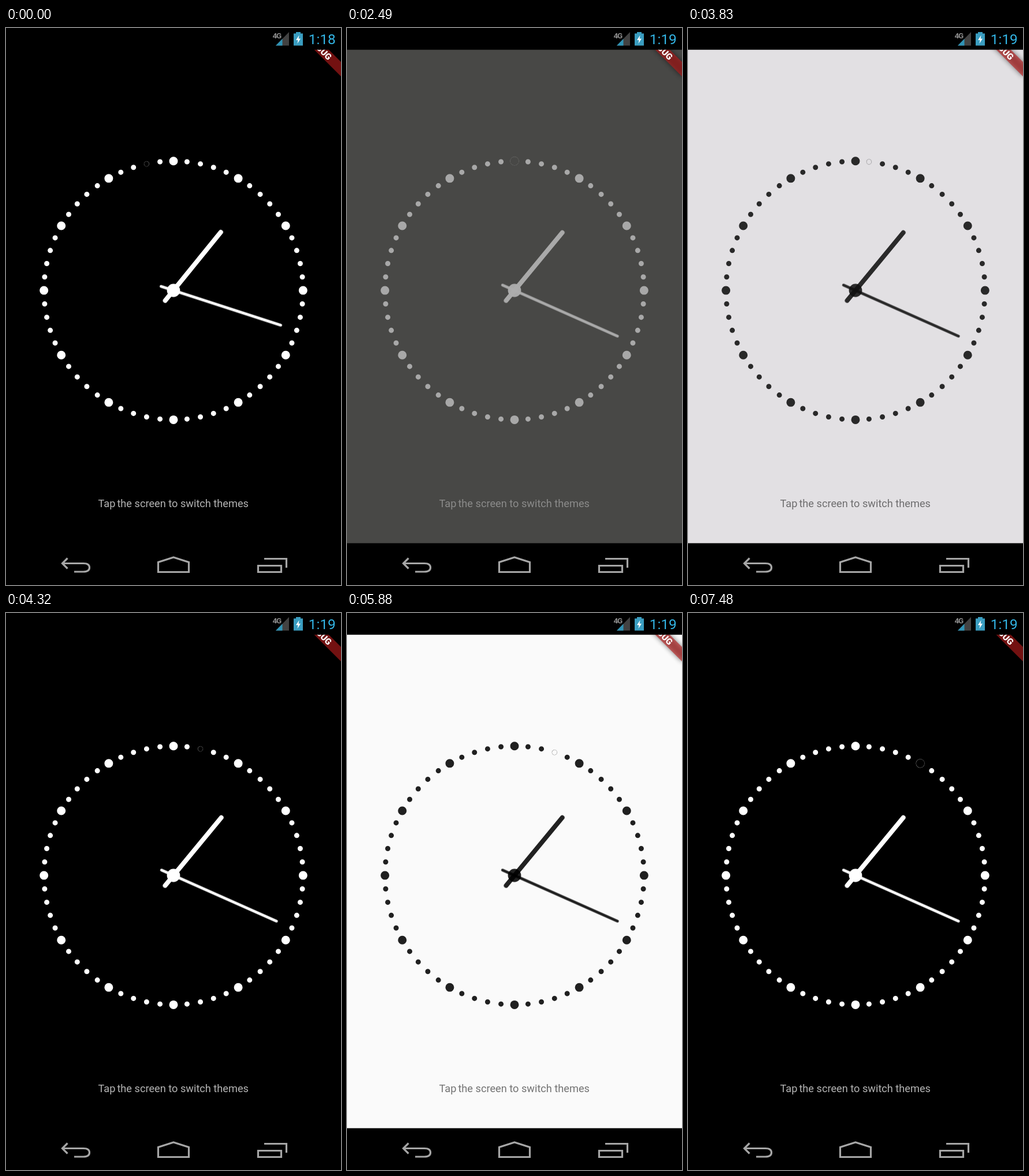
Animation of 580x966 px, one loop 7620 ms. Source, as an HTML page without scripts:

```html
<!DOCTYPE html>
<html lang="en">
<head>
<meta charset="utf-8">
<title>Analog clock</title>
<style>
  @property --bg { syntax: "<color>"; inherits: true; initial-value: #000; }
  @property --ink { syntax: "<color>"; inherits: true; initial-value: #fff; }
  @property --tip { syntax: "<color>"; inherits: true; initial-value: #fffb; }

  html, body { margin: 0; width: 100%; height: 100%; overflow: hidden; background: #000; }
  svg { display: block; width: 580px; height: 966px; font-family: Roboto, sans-serif; }

  .app { animation: theme 7.62s linear infinite; }
  .page { fill: var(--bg); }
  .hint { fill: var(--tip); font-size: 18.2px; }
  .dots { fill: none; stroke: var(--ink); stroke-linecap: round; }
  .hand { stroke: var(--ink); stroke-linecap: round; }
  .hub { fill: var(--ink); }

  .hour, .minute, .second, .old, .new, .ring { animation: 7.62s step-end infinite; }
  .hour { animation-name: hour; }
  .minute { animation-name: minute; }
  .second { animation-name: second; }
  .ring { animation-name: ring; fill: var(--bg); stroke: var(--ink); stroke-opacity: .09; }
  .old { animation-name: old; }
  .new { animation-name: new; }

  /* dark > light > dark > light > dark */
  @keyframes theme {
    0%, 29.27%, 56.5%, 65.09%, 92.8%, 100% { --bg: #000; --ink: #fff; --tip: rgba(255,255,255,.7); }
    32.68%, 69.55% { --bg: #484846; --ink: rgba(172,172,172,.97); --tip: rgba(180,180,180,.62); }
    37.3%, 48.69%, 74.7%, 83.86% { --bg: #fafafa; --ink: rgba(0,0,0,.87); --tip: rgba(0,0,0,.54); }
    50.26% { --bg: #e3e1e4; --ink: rgba(15,15,15,.88); --tip: rgba(18,18,18,.56); }
    88.19% { --bg: #a2a4a0; --ink: rgba(76,76,76,.9); --tip: rgba(76,76,76,.6); }
  }
  @keyframes second {
    0% { transform: rotate(-12deg); }
    13.12% { transform: rotate(-6deg); }
    25.59% { transform: rotate(0deg); }
    40.29% { transform: rotate(6deg); }
    53.41% { transform: rotate(12deg); }
    66.54% { transform: rotate(18deg); }
    80.05% { transform: rotate(24deg); }
    92.91%, 100% { transform: rotate(30deg); }
  }
  @keyframes ring {
    0%, 40.29% { r: 4.6px; }
    25.59%, 92.91%, 100% { r: 7.6px; }
  }
  @keyframes hour {
    0% { transform: rotate(39deg); }
    25.59%, 100% { transform: rotate(39.5deg); }
  }
  @keyframes minute {
    0% { transform: rotate(108deg); }
    25.59%, 100% { transform: rotate(114deg); }
  }
  @keyframes old {
    0% { visibility: visible; }
    25.59%, 100% { visibility: hidden; }
  }
  @keyframes new {
    0% { visibility: hidden; }
    25.59%, 100% { visibility: visible; }
  }
</style>
</head>
<body>
<svg viewBox="0 0 580 966">
  <defs>
    <filter id="soft" x="-20%" y="-100%" width="140%" height="300%">
      <feGaussianBlur stdDeviation="4"/>
    </filter>
  </defs>

  <g class="app">
    <rect class="page" y="37" width="580" height="858"/>

    <g transform="translate(290 455.1)">
      <circle class="dots" r="224.3" pathLength="60" stroke-width="9" stroke-dasharray="0 1 0 1 0 1 0 2" stroke-dashoffset="-1"/>
      <circle class="dots" r="224.3" pathLength="12" stroke-width="15" stroke-dasharray="0 1"/>
      <g class="second"><circle class="ring" cy="-224.3" r="4.6"/></g>
      <g class="hour"><path class="hand" d="M0 22.7V-130" stroke-width="8"/></g>
      <g class="minute"><path class="hand" d="M0 22.7V-195" stroke-width="4.8"/></g>
      <circle class="hub" r="11.4"/>
    </g>

    <text class="hint" x="289.7" y="831" text-anchor="middle">Tap <tspan dx="-1.5">the screen to switch themes</tspan></text>

    <g transform="translate(580 0) rotate(45)">
      <rect x="-59.4" y="41.6" width="118.8" height="17.8" fill-opacity=".5" filter="url(#soft)"/>
      <rect x="-59.4" y="41.6" width="118.8" height="17.8" fill="#b71c1c" fill-opacity=".627"/>
      <text y="55.9" text-anchor="middle" font-size="15.1" font-weight="900" fill="#fff">DEBUG</text>
    </g>
  </g>

  <!-- status bar -->
  <rect width="580" height="37.7"/>
  <text x="461.5" y="17.5" font-size="13.5" font-weight="700" letter-spacing="-1.2" fill="#8c8c8c">4G</text>
  <path d="M490 7V30.5H467Z" fill="#424242"/>
  <path d="M478.5 18.7V30.5H467Z" fill="#3093b5"/>
  <path d="M502 7H510V9.5H514V30.5H498V9.5H502Z" fill="#3a9dc0"/>
  <path d="M507.5 12.5L502 21H505.5L504.5 27L510 18.5H506.5Z" fill="#fff"/>
  <g font-size="24.4" fill="#33b5e5" text-anchor="end">
    <text class="old" x="570.8" y="28">1:18</text>
    <text class="new" x="570.8" y="28">1:19</text>
  </g>

  <!-- navigation bar -->
  <rect y="893.5" width="580" height="73"/>
  <g fill="none" stroke="#a6a6a6" stroke-width="3.2">
    <path d="M106.5 919.5L97.5 928.5L106.5 937.500M98 928.5H134Q144.500 928.500 144.500 935.700T134 943H118"/>
    <path d="M263.500 943.500V926.500L290 918L316.500 926.500V943.500Z"/>
    <path d="M436.500 932.500H476.500V943.500H436.500ZM447 920.500H485.500V936"/>
  </g>
</svg>
</body>
</html>
```
